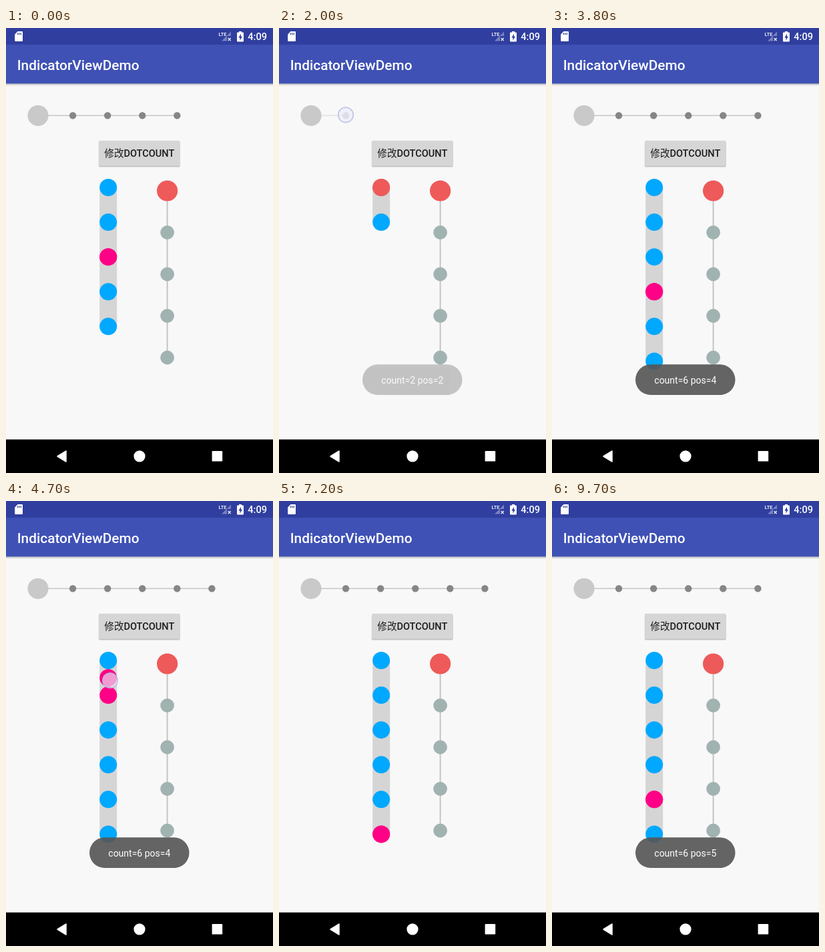
Write an HTML page that moves like this. It is 400x667 px and loops after 9.8 s.

```html
<!DOCTYPE html>
<html lang="en">
<head>
<meta charset="utf-8">
<title>Indicator view</title>
<style>
  html, body { margin: 0; width: 100%; height: 100%; overflow: hidden; background: #f8f8f8; }
  svg { display: block; width: 100%; height: 100%; }
  text { font-family: Roboto, "Noto Sans CJK SC", "Noto Sans CJK", sans-serif; }
  .medium { font-weight: 500; }
</style>
</head>
<body>
<svg viewBox="0 0 400 667">
  <defs>
    <linearGradient id="shade" x2="0" y2="1">
      <stop offset="0" stop-color="#000" stop-opacity=".28"/>
      <stop offset="1" stop-color="#000" stop-opacity="0"/>
    </linearGradient>
  </defs>
  <rect width="400" height="667" fill="#f8f8f8"/>
  <rect y="83" width="400" height="4" fill="url(#shade)"/>
  <rect y="25" width="400" height="58.3" fill="#3f51b5"/>
  <rect width="400" height="25" fill="#303f9f"/>
  <text class="medium" x="16.7" y="62.8" font-size="20.83" fill="#fff">IndicatorViewDemo</text>

  <!-- status bar -->
  <path d="M17.5 5H24q1 0 1 1V19q0 1-1 1H14.2q-1 0-1-1V9.4Z" fill="#fff"/>
  <path d="M17.6 7.2v3M20 7.2v3M22.4 7.2v3" stroke="#303f9f" stroke-width="1.2"/>
  <text class="medium" x="318.5" y="11.5" font-size="7.5" fill="#fff">LTE</text>
  <path d="M337 5.5V12H331V19.5H323Z" fill="#fff" opacity=".35"/>
  <path d="M332.7 15l4 4.2m0-4.2l-4 4.2" stroke="#fff" stroke-width="1.2"/>
  <path d="M349 5h4v1.6h2q1 0 1 1V19.4q0 1-1 1h-8q-1 0-1-1V7.6q0-1 1-1h2Z" fill="#fff"/>
  <path d="M352 8.8l-3.6 5.6h2.1v4l3.5-5.6h-2Z" fill="#303f9f"/>
  <text class="medium" x="391" y="18" text-anchor="end" font-size="14.58" fill="#fff">4:09</text>

  <!-- button -->
  <rect x="138.5" y="170" width="122.5" height="39" rx="2.5" fill="#000" opacity=".09"/>
  <rect x="139" y="169.5" width="121.5" height="38.5" rx="2" fill="#000" opacity=".14"/>
  <rect x="139" y="168.7" width="121.5" height="38" rx="2" fill="#d6d6d6"/>
  <text class="medium" x="199.8" y="193.3" text-anchor="middle" font-size="14.58" fill="#1c1c1c">修改DOTCOUNT</text>

  <g id="row"></g>
  <g id="column"></g>
  <g id="fixed"></g>

  <g id="toast">
    <rect x="125" y="504.3" width="149.5" height="45.8" rx="22.9" fill="#565656" fill-opacity=".91"/>
    <text id="message" x="199.8" y="533.3" text-anchor="middle" font-size="14" fill="#fff"></text>
  </g>
  <circle id="pointer" r="11.3" fill="#ebebfa" fill-opacity=".66" stroke="#b4b8e4" stroke-opacity=".85" stroke-width="1.5"/>

  <!-- navigation bar -->
  <rect y="616.7" width="400" height="51" fill="#000"/>
  <path d="M77 642L90 634V650Z" fill="#fff" stroke="#fff" stroke-width="1.5" stroke-linejoin="round"/>
  <circle cx="200" cy="641.8" r="8.6" fill="#fff"/>
  <rect x="308.6" y="634" width="15.6" height="15.6" rx="1.2" fill="#fff"/>
</svg>
<script>
const LOOP = 9800, STEP = 100, GAP = 52.08;
const ROW = { x: 48, y: 131.3 }, COLUMN = { x: 153.2, y: 239 };
const BLUE = '#00a8ff', PINK = '#ff0086', RED = '#ee5a5a';

// [start, dot count, selected position]
const settings = [[0, 5, 3], [300, 2, 2], [3200, 6, 4], [7800, 3, 3], [8900, 6, 5]];
const toasts = [[300, 2084], [3200, 4980], [7800, 12000]];
// Selected index of the column; equal times are hard changes.
const selection = [[0, 2], [300, 2], [300, 1], [1200, 1], [1500, 0], [3200, 0], [3200, 3],
  [4200, 3], [4800, 0], [5200, 0], [5500, .69], [6000, 4], [6300, 4.25], [6700, 5],
  [7800, 5], [7800, 2], [8900, 2], [8900, 4]];
const rowSelection = [[0, 0], [2100, 0], [2400, 1], [3200, 1], [3200, 0]];
const fingerX = [[0, 156], [5500, 156], [6000, 167], [6700, 172]];

const el = id => document.getElementById(id);
const within = (t, a, b) => t >= a && t < b;
const circle = (x, y, r, fill) => `<circle cx="${x}" cy="${y}" r="${r}" fill="${fill}"/>`;
const line = (x1, y1, x2, y2, color, width) =>
  `<path d="M${x1} ${y1}L${x2} ${y2}" stroke="${color}" stroke-width="${width}"/>`;
const range = (n, draw) => Array.from({ length: n }, (_, i) => draw(i)).join('');

function sample(keys, t) {
  const next = keys.findIndex(key => key[0] > t);
  if (next < 0) return keys[keys.length - 1][1];
  const [t0, a] = keys[next - 1], [t1, b] = keys[next];
  return a + (b - a) * (t - t0) / (t1 - t0);
}

function drawRow(t, count) {
  const { x, y } = ROW;
  const fade = within(t, 1800, 2300) ? .45 : 1;
  el('row').innerHTML =
    `<g opacity="${fade}">` + line(x, y, x + (count - 1) * GAP, y, '#c8c8c8', 1.6) +
    range(count, i => circle(x + i * GAP, y, 5.2, '#868686')) + '</g>' +
    circle(x + sample(rowSelection, t) * GAP, y, 15.6, '#c9c9c9');
}

function drawColumn(t, count, index) {
  const { x, y } = COLUMN;
  const active = within(t, 1100, 3200) ? RED : PINK;
  el('column').innerHTML =
    line(x, y, x, y + (count - 1) * GAP, '#d5d5d5', 26) +
    range(count, i => circle(x, y + i * GAP, 13, i === Math.round(index) ? active : BLUE)) +
    circle(x, y + index * GAP, 13, active);
}

function drawToast(t, count, position) {
  const shown = toasts.find(([a, b]) => within(t, a, b));
  const alpha = shown ? Math.min(1, (t - shown[0]) / 200, (shown[1] - t) / 234) : 0;
  el('toast').setAttribute('opacity', alpha);
  el('message').textContent = `count=${count} pos=${position}`;
}

function drawPointer(t, index) {
  let spot = null;
  if (settings.some(([start]) => start && within(t, start - 100, start + 100))) spot = [200, 190];
  else if (within(t, 1900, 2200)) spot = [100, 130.3];
  else if (within(t, 1200, 1600) || within(t, 4200, 6800))
    spot = [sample(fingerX, t), COLUMN.y + index * GAP + 4];
  el('pointer').setAttribute('visibility', spot ? 'visible' : 'hidden');
  if (spot) el('pointer').setAttribute('transform', `translate(${spot})`);
}

function render(t) {
  const [, count, position] = settings.filter(([start]) => start <= t).pop();
  const index = sample(selection, t);
  drawRow(t, count);
  drawColumn(t, count, index);
  drawToast(t, count, position);
  drawPointer(t, index);
}

el('fixed').innerHTML = line(241.6, 244, 241.6, 494, '#c4c4c4', 2) +
  range(5, i => circle(241.6, 244 + i * 62.5, i ? 10.4 : 15.6, i ? '#a1b3b1' : RED));

const begin = performance.now();
function tick() {
  const t = (performance.now() - begin) % LOOP;
  render(Math.floor(t / STEP) * STEP);
  requestAnimationFrame(tick);
}
tick();
</script>
</body>
</html>
```
